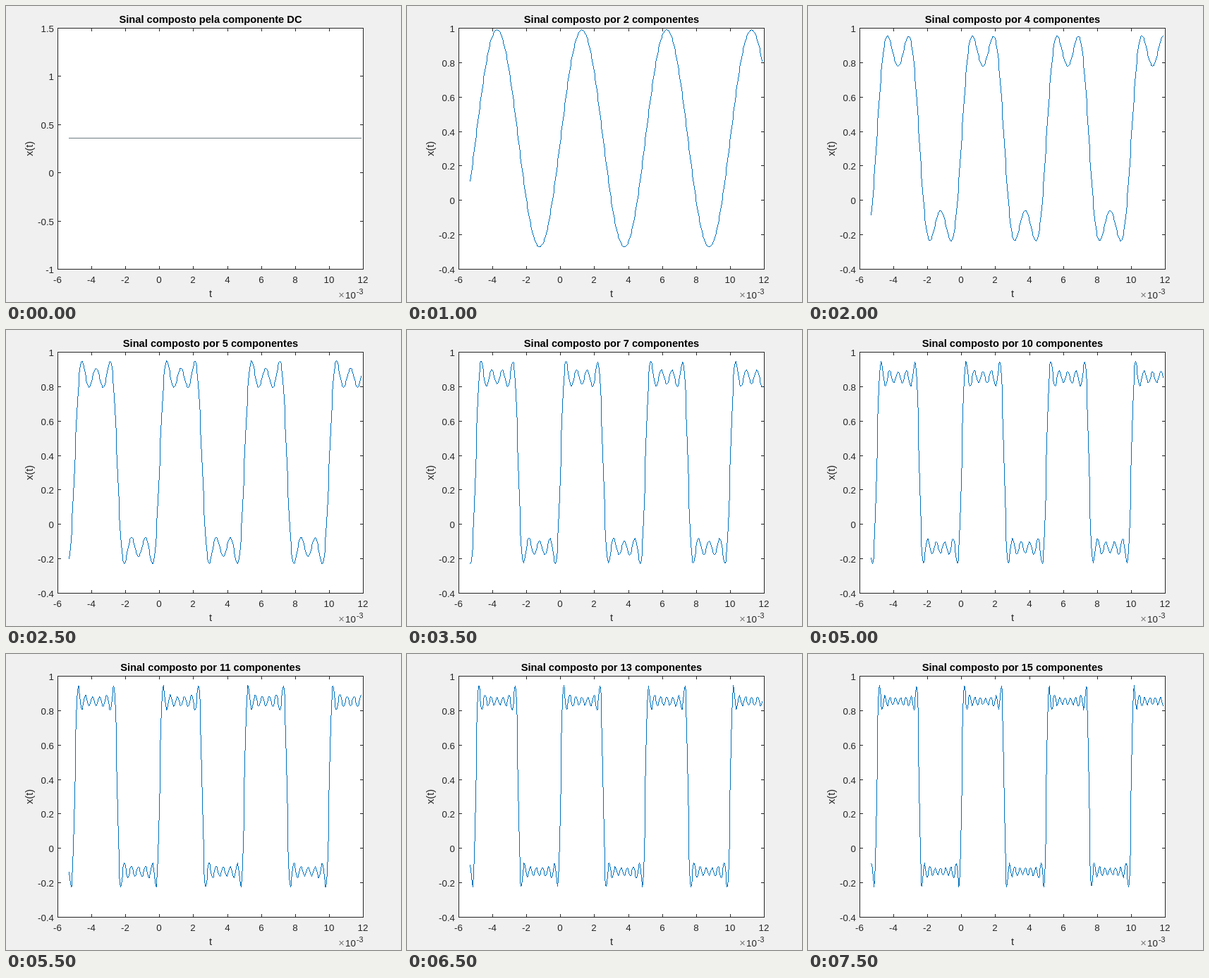
An HTML page with a canvas for the animation above (8000 ms loop, 560x420 px).

```html
<!DOCTYPE html>
<html lang="pt">
<head>
<meta charset="utf-8">
<style>
html, body { margin: 0; width: 100%; height: 100%; overflow: hidden; background: #f0f0f0; }
canvas { display: block; }
</style>
</head>
<body>
<canvas id="stage" width="560" height="420"></canvas>
<script>
const ctx = document.getElementById('stage').getContext('2d');
const STEP = 500, STEPS = 16;
const LEFT = 73.5, TOP = 31.5, W = 433, H = 342, TICK = 5;
const RIGHT = LEFT + W, BOTTOM = TOP + H;
const INK = '#262626', FONT = '"Liberation Sans", Arial, sans-serif';
const T0 = -5.32, T1 = 11.87, PERIOD = 5, DC = 0.36;

const px = t => LEFT + (t + 6) / 18 * W;
const snap = v => Math.floor(v) + 0.5;

function text(str, x, y, size, align = 'center', color = INK, weight = '') {
  ctx.font = `${weight} ${size}px ${FONT}`;
  ctx.textAlign = align;
  ctx.fillStyle = color;
  ctx.fillText(str, x, y);
}

function line(x1, y1, x2, y2) {
  ctx.beginPath();
  ctx.moveTo(x1, y1);
  ctx.lineTo(x2, y2);
  ctx.stroke();
}

// One-pixel line without smoothing
function crispLine(x1, y1, x2, y2) {
  const n = Math.max(Math.abs(x2 - x1), Math.abs(y2 - y1), 1);
  for (let i = 0; i <= n; i++) {
    const k = i / n;
    ctx.fillRect(Math.round(x1 + (x2 - x1) * k), Math.round(y1 + (y2 - y1) * k), 1, 1);
  }
}

// Partial Fourier sum of a square wave with faint even terms
function signal(t, count) {
  let v = DC;
  for (let n = 1; n <= count; n++) {
    const amp = n % 2 ? 0.63 : 0.002;
    v += amp / n * Math.sin(2 * Math.PI * n * t / PERIOD);
  }
  return v;
}

function drawAxes(lo, hi, step, py) {
  ctx.strokeStyle = INK;
  ctx.lineWidth = 1;
  ctx.strokeRect(LEFT, TOP, W, H);
  for (let t = -6; t <= 12; t += 2) {
    const x = snap(px(t));
    line(x, BOTTOM, x, BOTTOM - TICK + 0.5);
    line(x, TOP, x, TOP + TICK - 0.5);
    text(String(t), x - 0.5, 393, 13.333);
  }
  const n = Math.round((hi - lo) / step);
  for (let i = 0; i <= n; i++) {
    const v = Math.round((lo + i * step) * 10) / 10;
    const y = snap(py(v));
    line(LEFT, y, LEFT + TICK - 0.5, y);
    line(RIGHT, y, RIGHT - TICK + 0.5, y);
    text(String(v), 68, y + 5.5, 13.333, 'right');
  }
  text('t', 290, 413, 14.667);
  text('×', 475.5, 415, 14.667, 'center', '#777');
  text('10', 481, 415, 13.333, 'left');
  text('-3', 497, 409, 10.667, 'left');
  ctx.save();
  ctx.translate(37.5, 202.5);
  ctx.rotate(-Math.PI / 2);
  text('x(t)', 0, 0, 14.667);
  ctx.restore();
}

function drawCurve(count, py) {
  ctx.fillStyle = count ? '#0072bd' : '#6f7b80';
  const n = 500;
  let x0, y0;
  for (let i = 0; i <= n; i++) {
    const t = T0 + (T1 - T0) * i / n;
    const x = Math.floor(px(t)), y = Math.floor(py(signal(t, count)));
    if (i) crispLine(x0, y0, x, y);
    x0 = x;
    y0 = y;
  }
}

function draw(count) {
  const [lo, hi, step] = count ? [-0.4, 1, 0.2] : [-1, 1.5, 0.5];
  const py = v => TOP + (hi - v) / (hi - lo) * H;
  ctx.fillStyle = '#f0f0f0';
  ctx.fillRect(0, 0, 560, 420);
  ctx.fillStyle = '#fff';
  ctx.fillRect(LEFT, TOP, W, H);
  drawAxes(lo, hi, step, py);

  const title = count ? `por ${count} componentes` : 'pela componente DC';
  text('Sinal composto ' + title, 290, 24, 14.667, 'center', '#000', 'bold');
  drawCurve(count, py);
}

const start = performance.now();
let shown = -1;
function tick() {
  const count = Math.floor((performance.now() - start) / STEP) % STEPS;
  if (count !== shown) draw(shown = count);
  requestAnimationFrame(tick);
}
tick();
</script>
</body>
</html>
```
